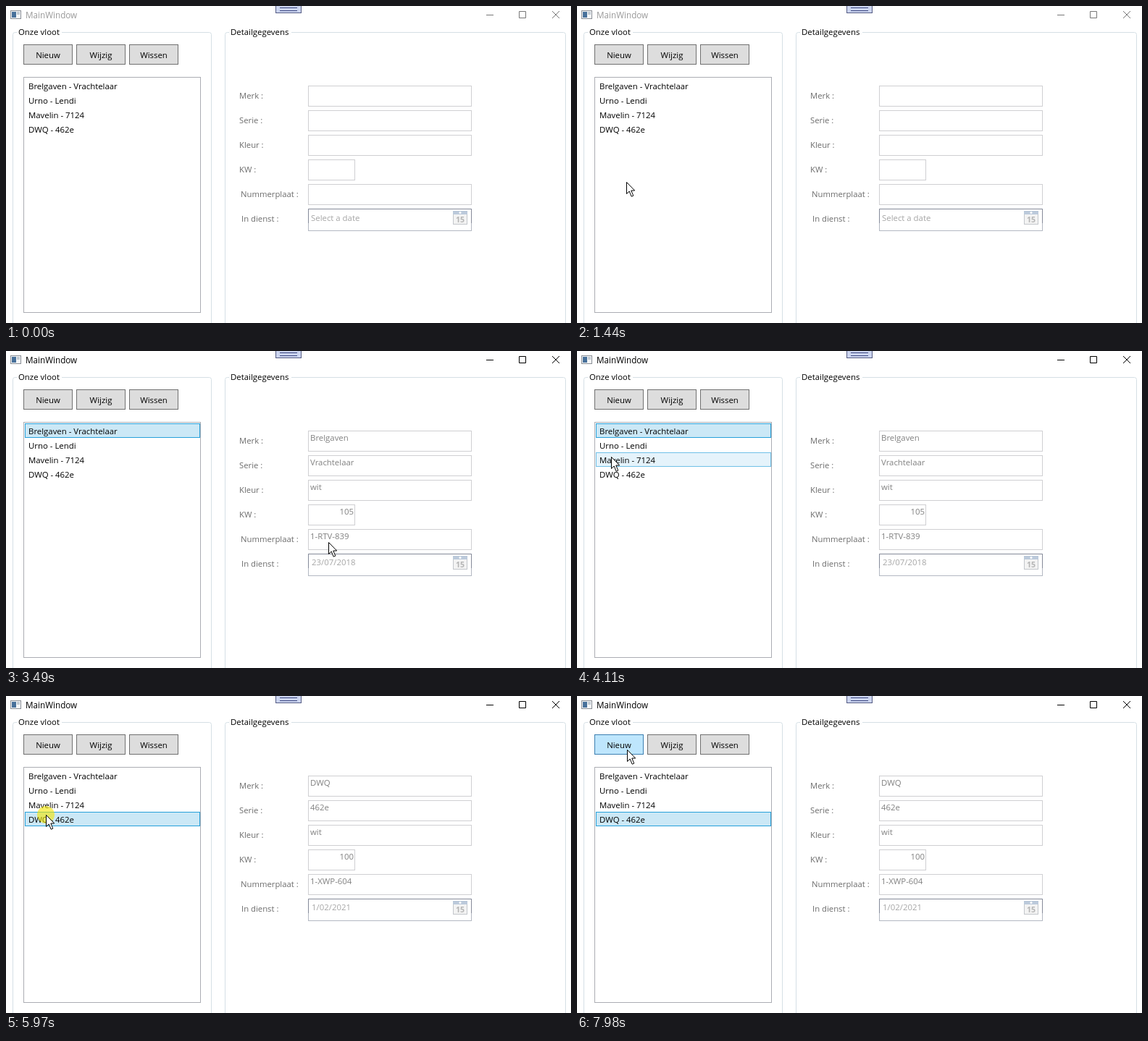
These frames come from a looping animation (780 by 438 pixels, 8 s). An HTML page:

```html
<!DOCTYPE html>
<html lang="nl">
<head>
<meta charset="utf-8">
<title>MainWindow</title>
<style>
html, body { margin: 0; width: 100%; height: 100%; overflow: hidden; background: #fff; }
svg { display: block; width: 100vw; height: 100vh; }
text { font-family: "Open Sans", "Noto Sans", sans-serif; font-size: 11.4px; white-space: pre; }
</style>
</head>
<body>
<svg id="stage" viewBox="0 0 780 438"></svg>
<script>
const LOOP = 8000;
const stage = document.getElementById('stage');

function add(tag, attrs, content) {
  const el = document.createElementNS('http://www.w3.org/2000/svg', tag);
  set(el, attrs);
  if (content !== undefined) el.textContent = content;
  stage.appendChild(el);
  return el;
}
function set(el, attrs) {
  for (const name in attrs) el.setAttribute(name, attrs[name]);
}
function fillRect(x, y, width, height, fill) {
  return add('rect', { x, y, width, height, fill });
}
// Box with a crisp one pixel border; x, y, w, h are outer pixels.
function box(x, y, w, h, fill, stroke, rx = 0) {
  return add('rect', { x: x + .5, y: y + .5, width: w - 1, height: h - 1, fill, stroke, rx });
}
function label(x, y, str, fill = '#000', anchor = 'start', size = 11.4) {
  return add('text', { x, y, fill, 'text-anchor': anchor, style: `font-size:${size}px` }, str);
}
function line(d, stroke) {
  return add('path', { d, stroke, fill: 'none' });
}

const cars = [
  ['Brelgaven', 'Vrachtelaar', 'wit', '105', '1-RTV-839', '23/07/2018'],
  ['Urno', 'Lendi', 'zwart', '85', '1-QHN-271', '14/03/2019'],
  ['Mavelin', '7124', 'bruin', '110', '1-GSB-548', '6/05/2020'],
  ['DWQ', '462e', 'wit', '100', '1-XWP-604', '1/02/2021']
];

// Title bar
box(6, 6, 15, 12, '#f4f6f8', '#8a8f96');
fillRect(8, 8, 6, 8, '#47709a');
fillRect(15, 8, 4, 4, '#c3cbd3');
const title = label(27, 17, 'MainWindow', '#999', 'start', 11.7);
const controls = ['M663 12.5H673', 'M708.5 7.5H717.5V16.5H708.5Z', 'M754 7L764 17M764 7L754 17']
  .map(d => line(d, '#777'));
box(372, -2, 36, 12, '#ccd5f0', '#565d85');
line('M378 2.5H402M378 6.5H402', '#3b4680');

// Group boxes
box(9, 36, 275, 420, 'none', '#d5dfe5', 3);
box(302, 36, 471, 420, 'none', '#d5dfe5', 3);
fillRect(15, 34, 62, 5, '#fff');
fillRect(308, 34, 86, 5, '#fff');
label(17, 40, 'Onze vloot');
label(310, 40, 'Detailgegevens');

// Buttons and list
const buttons = ['Nieuw', 'Wijzig', 'Wissen'].map((name, i) => {
  const x = 24 + 73 * i;
  const el = box(x, 53, 68, 28, '#ddd', '#707070');
  label(x + 34, 72, name, '#000', 'middle');
  return { x, el };
});
box(24, 98, 245, 326, '#fff', '#abadb3');
const rows = cars.map((car, i) => {
  const el = box(26, 100 + 20 * i, 242, 20, 'none', 'none');
  label(31, 115 + 20 * i, car[0] + ' - ' + car[1]);
  return el;
});

// Detail fields
const captions = ['Merk :', 'Serie :', 'Kleur :', 'KW :', 'Nummerplaat :', 'In dienst :'];
const fields = captions.map((caption, i) => {
  const y = 110 + 34 * i, isDate = i === 5, isPower = i === 3;
  label(isDate ? 325 : i === 4 ? 324 : 322, y + 18, caption, '#6c6c6c', 'start', 11.3);
  box(417, y, isPower ? 65 : 226, isDate ? 31 : 29, '#fff', isDate ? '#b3b8c2' : '#cfcfd2');
  if (isDate) line(`M417.5 ${y + 20}V${y + .5}H642.5V${y + 20}`, '#858a99');
  return label(isPower ? 480 : isDate ? 422 : 420, y + (isDate ? 16 : 14), '',
    isDate ? '#a6a6a6' : '#808080', isPower ? 'end' : 'start');
});
box(617, 283, 20, 19, '#f3f3f3', '#c3c6cb');
fillRect(617, 283, 20, 5, '#bccadb');
add('circle', { cx: 627, cy: 285.5, r: 1.5, fill: '#fff' });
label(627, 299, '15', '#b4b4b4', 'middle', 10.5).style.fontWeight = 700;

// Pointer
const halo = add('circle', { r: 12, fill: '#f4e600', opacity: .6 });
const pointer = add('path', {
  d: 'M.5 .5V16.5L4.2 13L7.2 20.2L9.8 19.1L6.8 12H11.7Z',
  fill: '#fff', stroke: '#000'
});

// Evenly timed waypoints; a move with only two eases in and out.
const moves = [
  { start: 680, end: 1440, steps: 11, path: '727,414 370,205 90,54 16,90 45,205 68,243' },
  { start: 1530, end: 1740, steps: 4, path: '68,249 46,105' },
  { start: 1910, end: 1990, steps: 2, path: '45,102 45,105' },
  { start: 2610, end: 3410, steps: 11, path: '46,92 240,170 440,262 452,268' },
  { start: 3490, end: 4190, steps: 10, path: '445,264 200,190 46,162 48,138' },
  { start: 4680, end: 4900, steps: 4, path: '48,141 49,150' },
  { start: 5440, end: 5580, steps: 3, path: '51,156 55,164' },
  { start: 6430, end: 6980, steps: 8, path: '60,167 488,274' },
  { start: 7070, end: 7210, steps: 3, path: '474,235 417,120' },
  { start: 7370, end: 7980, steps: 9, path: '405,119 69,74' }
].map(m => ({ ...m, points: m.path.split(' ').map(p => p.split(',').map(Number)) }));

const clicks = [
  { press: 2290, select: 2460, release: 2460 },
  { press: 4340, select: 4430, release: 4510 },
  { press: 5060, select: 5120, release: 5200 },
  { press: 5890, select: 5970, release: 6050 }
];

function pointerAt(t) {
  const move = moves.filter(m => t >= m.start).pop();
  if (!move) return null;
  const { start, end, steps, points } = move;
  const last = steps - 1;
  const step = Math.min(last, Math.floor((t - start) / (end - start) * last + .15));
  let f = step / last;
  if (points.length === 2) f = f * f * (3 - 2 * f);
  f *= points.length - 1;
  const i = Math.min(Math.floor(f), points.length - 2);
  const [x, y] = points[i].map((v, k) => Math.round(v + (points[i + 1][k] - v) * (f - i)));
  return { x, y };
}

function draw(t) {
  const p = pointerAt(t);
  const inside = (x, y, w, h) => p && p.x >= x && p.x < x + w && p.y >= y && p.y < y + h;
  const active = t >= clicks[0].press;
  const pressed = clicks.some(c => t >= c.press && t < c.release);
  const index = clicks.filter(c => t >= c.select).length - 1;
  const chosen = cars[index];

  set(title, { fill: active ? '#000' : '#999' });
  controls.forEach(el => set(el, { stroke: active ? '#000' : '#777' }));
  buttons.forEach(b => {
    const hover = inside(b.x, 53, 68, 28);
    set(b.el, { fill: hover ? '#bee6fd' : '#ddd', stroke: hover ? '#3c7fb1' : '#707070' });
  });
  rows.forEach((el, i) => {
    const hover = inside(26, 100 + 20 * i, 242, 20);
    set(el, i === index ? { fill: '#cbe8f6', stroke: '#26a0da' }
      : hover ? { fill: '#e5f3fb', stroke: '#70c0e7' }
      : { fill: 'none', stroke: 'none' });
  });
  fields.forEach((el, i) => {
    el.textContent = chosen ? chosen[i] : i === 5 ? 'Select a date' : '';
  });
  set(fields[5], { x: chosen ? 422 : 421, y: chosen ? 296 : 297 });

  set(pointer, { visibility: p ? 'visible' : 'hidden' });
  set(halo, { visibility: pressed ? 'visible' : 'hidden' });
  if (p) {
    set(pointer, { transform: `translate(${p.x} ${p.y})` });
    set(halo, { cx: p.x, cy: p.y });
  }
}

const began = performance.now();
function tick() {
  draw((performance.now() - began) % LOOP);
  requestAnimationFrame(tick);
}
tick();
</script>
</body>
</html>
```
